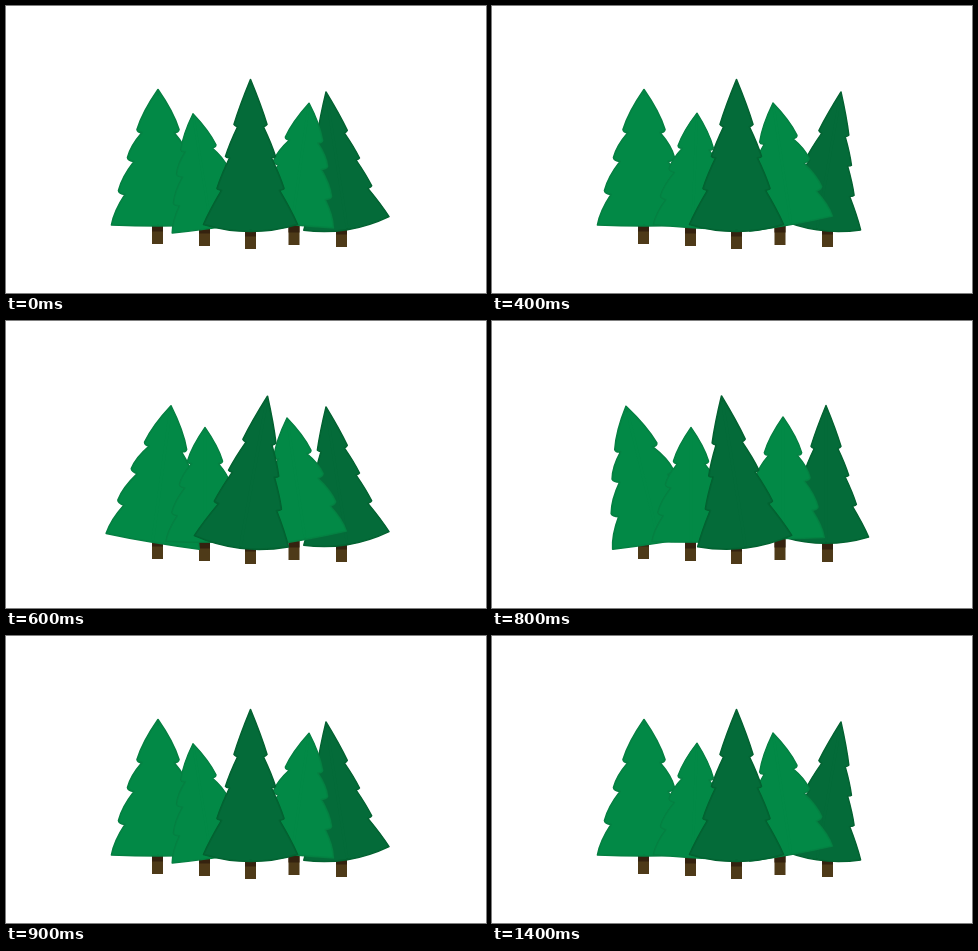
An HTML page with a canvas for the animation above (1.6 s loop, 480 by 287 pixels).

```html
<!DOCTYPE html>
<html lang="en">
<head>
<meta charset="utf-8">
<title>Swaying trees</title>
<style>
html, body { margin: 0; width: 100%; height: 100%; overflow: hidden; background: #fff; }
canvas { display: block; }
</style>
</head>
<body>
<canvas id="stage" width="480" height="287"></canvas>
<script>
const ctx = document.getElementById('stage').getContext('2d');

// Half profile from the apex down: [half width, height] of tips and notches in turn
const light = {
  fill: '#028946', edge: '#067d40', bulge: 3, sag: 136.5,
  side: [[21, 40], [16, 43], [30.5, 68], [24, 72], [39.5, 101], [33, 105], [46.5, 135.5]]
};
const dark = {
  fill: '#046b39', edge: '#025f2e', bulge: 1, sag: 152,
  side: [[16.5, 45], [13, 47.5], [25, 77], [21, 78.5], [33.5, 109], [29, 111], [47, 145]]
};

function outline({ side, bulge, sag }) {
  const path = new Path2D();
  for (const dir of [-1, 1]) {
    let x = 0, y = 0;
    path.moveTo(0, 0);
    side.forEach(([px, py], i) => {
      const [cx, cy] = i % 2
        ? [x - 0.5, y + bulge]
        : [x + (px - x) * 0.6 + bulge, y + (py - y) * 0.6 - bulge / 2];
      path.quadraticCurveTo(dir * cx, cy, dir * px, py);
      [x, y] = [px, py];
    });
    path.quadraticCurveTo(dir * x / 2, sag, 0, sag);
    path.closePath();
  }
  return path;
}
light.path = outline(light);
dark.path = outline(dark);

// Leans: [apex shift, horizontal shear, vertical shear]
const up = [0, 0, 0];
const trees = [
  { kind: light, x: 152, y: 83.5, size: 1, trunk: [146, 238],
    left: [-18, -0.245, -0.16], right: [13, 0.135, 0.17], poses: 'ulur' },
  { kind: light, x: 199, y: 106.5, size: 0.84, trunk: [193, 240],
    left: [-12, -0.16, -0.14], right: [6, 0.04, 0.06], poses: 'luru' },
  { kind: dark, x: 334, y: 84.5, size: 0.907, trunk: [330, 241],
    left: [-14, -0.155, -0.16], right: [15, 0.175, 0.15], poses: 'lurl' },
  { kind: light, x: 291, y: 96, size: 0.89, trunk: [282.5, 239],
    left: [-10, -0.15, -0.18], right: [12, 0.14, 0.1], poses: 'rull' },
  { kind: dark, x: 244.5, y: 73.5, size: 1, trunk: [239, 243],
    left: [-15, -0.16, -0.12], right: [17, 0.18, 0.12], poses: 'ulur' }
];

// The sway runs forward, back quickly, then forward again: [start, pose]
const steps = [[0, 0], [200, 1], [400, 2], [600, 3], [700, 2], [800, 1], [900, 0], [1200, 1], [1400, 2]];

function drawTrunk([x, bottom]) {
  ctx.fillStyle = '#4e3a18';
  ctx.fillRect(x, bottom - 30, 11, 30);
  ctx.fillStyle = '#35220f';
  ctx.fillRect(x, bottom - 30, 11, 17.5);
}

function drawTree(tree, pose) {
  const { kind, x, y, size } = tree;
  const [shift, shear, tilt] = { u: up, l: tree.left, r: tree.right }[tree.poses[pose]];
  ctx.setTransform(size, tilt * size, -shear * size, size, x + shift, y + Math.abs(shift) / 10);
  ctx.fillStyle = kind.fill;
  ctx.strokeStyle = kind.edge;
  ctx.lineWidth = 1.6;
  ctx.lineJoin = 'round';
  ctx.stroke(kind.path);
  ctx.fill(kind.path);
  // Soft rim inside the shape, cleared from the centre line
  ctx.save();
  ctx.clip(kind.path);
  ctx.globalAlpha = 0.5;
  ctx.lineWidth = 2;
  ctx.stroke(kind.path);
  ctx.restore();
  ctx.fillRect(-1.5, 6, 3, kind.sag - 8);
}

function frame(now) {
  const time = now % 1600;
  const pose = steps.findLast(([start]) => start <= time)[1];
  ctx.setTransform(1, 0, 0, 1, 0, 0);
  ctx.clearRect(0, 0, 480, 287);
  trees.forEach(tree => drawTrunk(tree.trunk));
  trees.forEach(tree => drawTree(tree, pose));
}

const begin = performance.now();
(function loop() {
  frame(performance.now() - begin);
  requestAnimationFrame(loop);
})();
</script>
</body>
</html>
```
